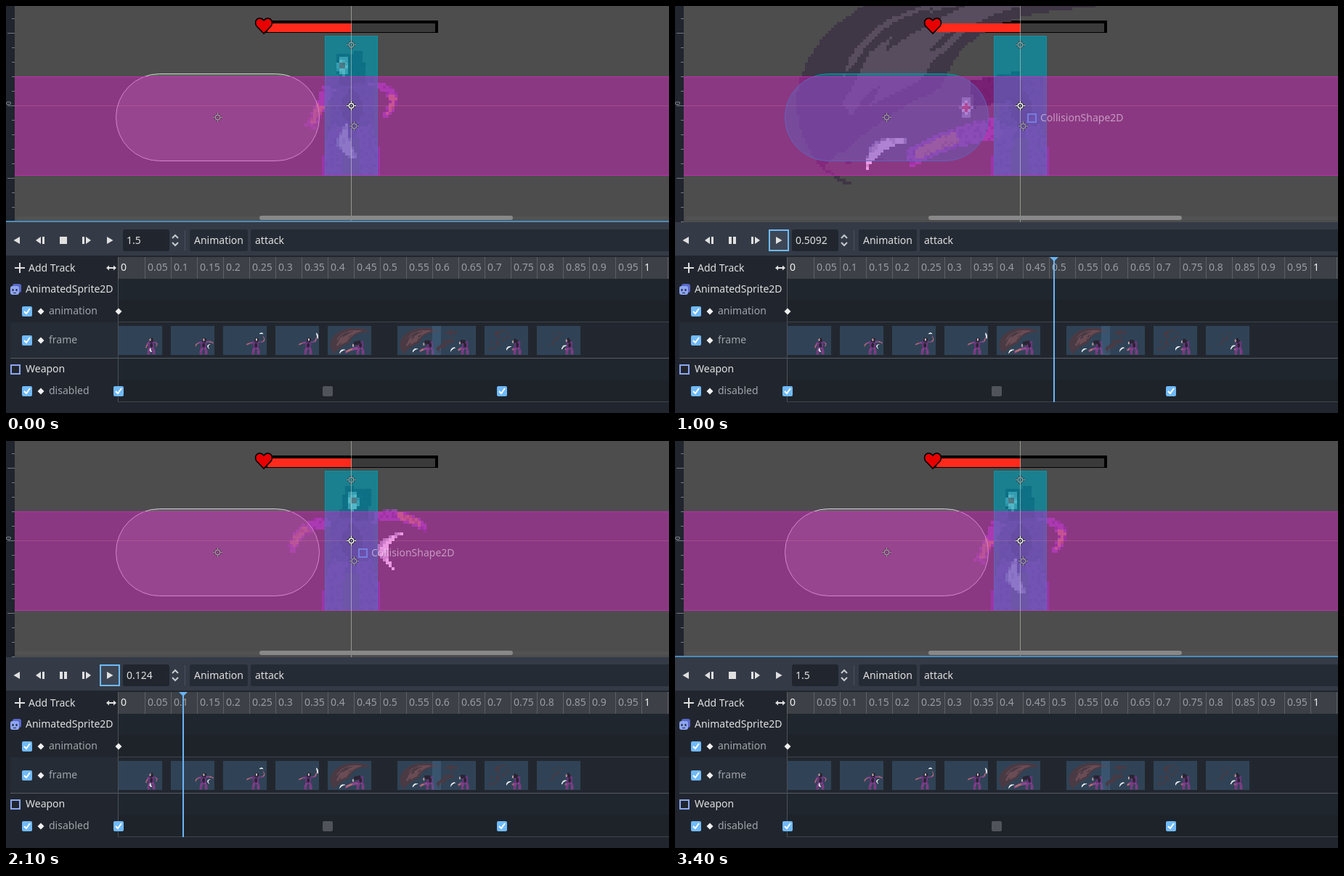
These frames come from a looping animation (913 px wide and 561 px high, 3700 ms). An HTML page with a canvas:

```html
<!DOCTYPE html>
<html lang="en">
<head>
<meta charset="utf-8">
<title>Attack animation</title>
<style>
html, body { margin: 0; width: 100%; height: 100%; overflow: hidden; background: #21262e; }
#stage { position: relative; width: 913px; height: 561px; overflow: hidden; font: 14px/20px "Noto Sans", "Open Sans", sans-serif; }
canvas, .t, #head { position: absolute; left: 0; top: 0; }
.t { white-space: pre; }
#head { top: 346px; width: 2px; height: 200px; background: #6ab5f5; }
#head::before { content: ""; position: absolute; left: -5px; border: 6px solid transparent; border-top: 6px solid #6ab5f5; border-bottom: 0; }
</style>
</head>
<body>
<div id="stage"><canvas id="view" width="913" height="561"></canvas></div>
<script>
const stage = document.getElementById('stage');
const g = document.getElementById('view').getContext('2d');
const BLUE = '#70bafa', LIGHT = '#e0e0e0', DIM = '#a0a4aa';

function rect(color, x, y, w, h) { g.fillStyle = color; g.fillRect(x, y, w, h); }
function round(color, x, y, w, h, r) {
  g.fillStyle = color; g.beginPath(); g.roundRect(x, y, w, h, r); g.fill();
}
function box(color, width, x, y, w, h) {
  g.strokeStyle = color; g.lineWidth = width; g.strokeRect(x, y, w, h);
}
function polygon(pts) {
  const p = new Path2D();
  for (const [x, y] of pts) p.lineTo(x, y);
  p.closePath();
  return p;
}
function stroke(color, width, ...pts) {
  g.strokeStyle = color; g.lineWidth = width; g.beginPath();
  for (let i = 0; i < pts.length; i += 2) g.lineTo(pts[i], pts[i + 1]);
  g.stroke();
}
// Triangle pointing along x (dir is 1 or -1), tip at x
function arrow(x, y, dir, len, half) {
  g.fillStyle = LIGHT;
  g.fill(polygon([[x, y], [x - dir * len, y - half], [x - dir * len, y + half]]));
}
function text(x, y, str, color = LIGHT) {
  const el = document.createElement('div');
  el.className = 't';
  el.style.cssText = `left:${x}px;top:${y - 10}px;color:${color}`;
  el.textContent = str;
  stage.append(el);
  return el;
}

// --- Sprite ---
const COLORS = { dark: '#2c2535', cloak: '#4a3c68', leg: '#6a4690', arm: '#8550a0', skin: '#b37a68', white: '#f2f2f4', pale: '#9fabb5', eye: '#e84238', smoke: '#3f3646', mist: '#584d5e' };
const THUMB = { ...COLORS, smoke: '#493a44', mist: '#6a4c54', cloak: '#6a3a80', leg: '#84408c', arm: '#904a90' };

const lerp = (a, b, t) => a + (b - a) * t;
const mix = (a, b, t) => a.map((v, i) => lerp(v, b[i], t));
const bulge = t => Math.sin(Math.PI * t);

function random(seed) {
  return () => (seed = (seed * 16807) % 2147483647) / 2147483647;
}

// Area between two edges that are sampled from from to to
function strip(key, edge, from = 0, to = 1) {
  const left = [], right = [];
  for (let i = 0; i <= 16; i++) {
    const [a, b] = edge(lerp(from, to, i / 16));
    left.push(a); right.unshift(b);
  }
  return { key, pts: [...left, ...right] };
}

// Bowed stroke from a to b; width is a function of the way along it
function limb(key, a, b, bend, width, from, to) {
  const [dx, dy] = [b[0] - a[0], b[1] - a[1]], len = Math.hypot(dx, dy);
  const mid = [(a[0] + b[0]) / 2 - dy * bend, (a[1] + b[1]) / 2 + dx * bend];
  return strip(key, t => {
    const p = mix(mix(a, mid, t), mix(mid, b, t), t), w = width(t) / 2 / len;
    return [[p[0] - dy * w, p[1] + dx * w], [p[0] + dy * w, p[1] - dx * w]];
  }, from, to);
}

// Point on the swing of the blade: u runs along it, depth from its outer to its inner edge
function swing(u, depth) {
  const angle = -(50 + 160 * u) * Math.PI / 180;
  const r = 1 - .75 * depth * Math.abs(bulge(u ** 1.4)) ** .6;
  return [420 + 253 * Math.cos(angle) * r, 135 + 175 * Math.sin(angle) * r];
}
function streak(key, depth, thick, from, to, power = 1) {
  return strip(key, u => {
    const half = thick / 2 * Math.max(0, bulge((u - from) / (to - from))) ** power;
    return [swing(u, depth - half), swing(u, depth + half)];
  }, from, to);
}
function streaks(seed, count, thick, long) {
  const rnd = random(seed);
  return Array.from({ length: count }, () => {
    const from = lerp(.27, .9, rnd());
    return streak('smoke', lerp(.1, .95, rnd()), thick * (.6 + rnd()), from, from + long * (.5 + rnd()));
  });
}
function smoke(stage) {
  if (stage > 1) return streaks(77 + stage, 46 - 7 * stage, .17 - .015 * stage, .2 - .035 * stage);
  return [
    strip('smoke', u => [swing(u, 0), swing(u, 1)]),
    streak('mist', .55, .62, .12, .86, .5),
    ...streaks(41, 14 + 8 * stage, .08, .22)];
}

function face([x, y]) {
  const oval = (key, w, h) => limb(key, [x, y - h], [x, y + h], 0, t => w * bulge(t) ** .4);
  return [oval('pale', 16, 14), oval('white', 11, 11), oval('eye', 8, 5)];
}
function arm(shoulder, hand, bend, thick) {
  const w = t => thick * (1 - .2 * t);
  return [limb('arm', shoulder, hand, bend, w), limb('skin', shoulder, hand, bend, t => w(t) * .6, .45, .9)];
}
function blade(a, b, bend, thick) {
  return [
    limb('pale', a, b, bend, t => thick * bulge(t) ** .6),
    limb('white', a, b, bend * .9, t => thick * .75 * bulge(t) ** .6)];
}
function body(head) {
  const wide = n => () => n;
  return [
    limb('cloak', [476, 98], [476, 180], 0, t => 66 - 8 * bulge(t)),
    limb('leg', [460, 165], [450, 234], .1, t => 22 + 8 * t),
    limb('leg', [492, 165], [502, 234], -.1, t => 22 + 8 * t),
    limb('dark', [476, 112], [476, 168], 0, t => 30 * bulge(t)),
    limb('dark', [head[0] + 8, head[1] - 18], [478, 108], 0, wide(38))];
}

// Wind-up: head x, then hand and bend of each arm, then blade ends, bend and width
const WIND_UP = [
  { head: 464, left: [418, 168], lb: 0, right: [520, 155], rb: -.8, from: [470, 162], to: [484, 212], bb: .45, bw: 18 },
  { head: 478, left: [392, 151], lb: .35, right: [578, 120], rb: -.25, from: [549, 125], to: [539, 181], bb: .9, bw: 15 },
  { head: 481, left: [378, 134], lb: .1, right: [550, 44], rb: .9, from: [510, 24], to: [553, 24], bb: -.35, bw: 15 },
  { head: 481, left: [378, 134], lb: .1, right: [558, 54], rb: .6, from: [556, 10], to: [572, 76], bb: -.2, bw: 18 }];

function windUp({ head, left, lb, right, rb, from, to, bb, bw }) {
  const top = [head, 83];
  return [...body(top), ...arm([446, 112], left, lb, 17), ...arm([506, 106], right, rb, 16), ...face(top), ...blade(from, to, bb, bw)];
}

// Strike: the figure rises from its low lunge while the smoke breaks up
function strike(n) {
  const t = n / 4, pull = 1 - (1 - t) ** 2;
  const head = mix([401, 140], [443, 92], t);
  return [...smoke(n), ...body(head),
    ...arm([448, 168], mix([320, 212], [432, 188], pull), .1, 30 - 10 * t),
    ...face(head), ...blade(mix([262, 228], [395, 186], t), mix([322, 186], [450, 142], t), -.45, 17)];
}
const poses = [...WIND_UP.map(windUp), ...[0, 1, 2, 3, 4].map(strike)];

// One canvas pixel per 4px cell; the grid starts at (-1, -58)
const CELL = 4, GRID_X = -1, GRID_Y = -58, COLS = 230, ROWS = 76;
function pixelate(pose, colors) {
  const canvas = document.createElement('canvas');
  canvas.width = COLS; canvas.height = ROWS;
  const c = canvas.getContext('2d');
  const rnd = random(9);
  for (const { key, pts } of pose) {
    const path = polygon(pts), xs = pts.map(p => p[0]), ys = pts.map(p => p[1]);
    const col = x => Math.floor((x - GRID_X) / CELL), row = y => Math.floor((y - GRID_Y) / CELL);
    const solid = key == 'smoke' || key == 'mist';
    for (let r = row(Math.min(...ys)); r <= row(Math.max(...ys)); r++) {
      for (let q = col(Math.min(...xs)); q <= col(Math.max(...xs)); q++) {
        if (!c.isPointInPath(path, GRID_X + (q + .5) * CELL, GRID_Y + (r + .5) * CELL)) continue;
        c.fillStyle = colors[key];
        c.fillRect(q, r, 1, 1);
        if (!solid && rnd() > .75) {
          c.fillStyle = 'rgba(20,10,30,.18)';
          c.fillRect(q, r, 1, 1);
        }
      }
    }
  }
  return canvas;
}
const sprites = poses.map(p => pixelate(p, COLORS));

function drawSprite(image, x, y, scale) {
  g.drawImage(image, x + GRID_X * scale, y + GRID_Y * scale, COLS * CELL * scale, ROWS * CELL * scale);
}

// --- Viewport ---
function gizmo(x, y, alpha) {
  g.save();
  g.translate(x, y);
  g.globalAlpha = alpha;
  for (const [color, w] of [['#222', 3.4], ['#fff', 1.4]]) {
    g.strokeStyle = color; g.lineWidth = w;
    g.beginPath(); g.arc(0, 0, 3.2, 0, 7); g.stroke();
    for (const [a, b] of [[1, 0], [-1, 0], [0, 1], [0, -1]]) stroke(color, w, a * 4, b * 4, a * 6.5, b * 6.5);
  }
  g.restore();
}

function viewport(pose, armed, hover, focus) {
  g.save();
  g.beginPath(); g.rect(0, 0, 913, 298); g.clip();
  rect('#4d4d4d', 0, 0, 913, 298);
  rect('#000', 357, 20, 238, 17);
  g.imageSmoothingEnabled = false;
  drawSprite(sprites[pose], 0, 0, 1);
  rect('#ff2a1c', 360, 24, 116, 12);
  rect('#3a3a3a', 476, 24, 115, 12);

  const heart = new Path2D('M355 38 L344.5 27 Q342 21 346 18 Q351 15 355 20 Q359 15 364 18 Q368 21 365.5 27 Z');
  g.fillStyle = '#e80000'; g.fill(heart);
  g.strokeStyle = '#000'; g.lineWidth = 1.6; g.stroke(heart);

  rect('rgba(0,153,176,.664)', 439, 41, 73, 193);
  box('rgba(0,160,180,.6)', 1, 439.5, 41.5, 72, 192);
  g.beginPath(); g.roundRect(151.5, 93.5, 280, 120, 60);
  g.fillStyle = armed ? 'rgba(0,153,179,.42)' : 'rgba(129,129,129,.42)'; g.fill();
  g.strokeStyle = armed ? '#0796ac' : '#cfcfcf'; g.stroke();
  rect('rgba(225,27,203,.42)', 12, 97, 901, 137);
  for (const y of [97, 233]) rect('rgba(225,40,203,.6)', 12, y, 901, 1);

  rect('rgba(240,150,170,.2)', 12, 137, 901, 1);
  rect('rgba(215,225,210,.5)', 475, 0, 1, 298);
  gizmo(475.5, 53.5, .45); gizmo(291.5, 153.5, .45); gizmo(479.5, 165.5, .45); gizmo(475.5, 137.5, 1);
  if (hover) box('rgba(125,145,245,.7)', 2, 486, 149, 11, 11);

  round('#525252', 14, 290, 905, 5, 2);
  round('#888', 349, 289, 349, 6, 3);
  rect('#20252e', 0, 0, 12, 298);
  for (let y = 17; y < 298; y += 20) {
    const major = (y - 37) % 100 == 0;
    rect('#747981', major ? 2 : 8, y, major ? 10 : 4, 1);
  }
  if (focus) rect('#4d8db9', 0, 296, 913, 2);
  g.restore();
}

function toolbar(playing, focus) {
  rect('#343b47', 0, 298, 913, 46);
  round('#21262e', 161, 308, 64, 30, 3);
  round('#252b34', 253, 308, 80, 30, 3);
  round('#252b34', 337, 308, 590, 30, 3);
  rect('#4b525d', 246, 309, 1, 28);
  for (const dir of [-1, 1]) stroke('#c8cacd', 2, 229, 323 + dir * 3, 233, 323 + dir * 7, 237, 323 + dir * 3);
  if (focus) {
    round('#3d4655', 129, 308, 28, 30, 3);
    box(BLUE, 2, 130, 309, 26, 28);
  }
  const bar = (x, w) => rect(LIGHT, x, 318, w, 10);
  arrow(10.5, 323, -1, 8.5, 5);
  arrow(41, 323, -1, 7, 5); bar(50, 3);
  if (playing) { bar(74, 4); bar(80, 4); } else bar(74, 10);
  bar(105, 3); arrow(117, 323, 1, 7, 5);
  arrow(147.5, 323, 1, 8.5, 5);
}

// --- Track list ---
const KEYS = [0, .1, .2, .3, .4, .5333, .6, .7, .8];
const timeX = t => 155 + 720 * t;

function check(x, y) {
  round(BLUE, x - 7, y - 7, 14, 14, 2);
  stroke('#fff', 2, x - 4, y, x - 1, y + 3, x + 4, y - 4);
}
function diamond(x, y) {
  g.fillStyle = '#f0f0f0';
  g.fill(polygon([[x - 4.5, y], [x, y - 4.5], [x + 4.5, y], [x, y + 4.5]]));
}

function tracks() {
  rect('#21262e', 0, 344, 913, 217);
  rect('#1e232a', 155, 376, 758, 170);
  for (const y of [376, 486]) rect('#20262e', 155, y, 758, 29);
  rect('#262c35', 6, 436, 149, 49);
  rect('#22272f', 155, 436, 758, 49);
  rect('#3d4046', 155, 346, 758, 30);
  for (let i = 0; i < 22; i++) rect('#5c5f64', 154 + 36 * i + (i > 0), 346, 1, 30);
  for (const y of [435, 545]) rect('#40454c', 155, y, 758, 1);
  rect('#565b62', 6, 485, 907, 1);
  rect('#4b5057', 154, 376, 1, 170);

  stroke(LIGHT, 2, 12, 361, 26, 361); stroke(LIGHT, 2, 19, 354, 19, 368);
  stroke(LIGHT, 2, 140, 361, 150, 361);
  arrow(138, 361, -1, 4, 3.5); arrow(152, 361, 1, 4, 3.5);

  round('#5a68c8', 9, 383, 12, 12, 3);
  round('#8da5f3', 6, 386, 12, 12, 3);
  rect('#252b40', 8.5, 390, 2, 3); rect('#252b40', 13.5, 390, 2, 3); rect('#252b40', 10, 395, 4, 1);
  box('#8da5f3', 2, 7, 495, 12, 12);

  for (const y of [421, 461, 531]) { check(29, y); diamond(48, y); }
  diamond(155, 421);
  g.imageSmoothingEnabled = true;
  KEYS.forEach((key, i) => {
    const x = Math.round(timeX(key));
    rect('rgba(70,110,145,.4)', x, 441, 60, 40);
    g.save();
    g.beginPath(); g.rect(x, 441, 60, 40); g.clip();
    drawSprite(pixelate(poses[i], THUMB), x + 45 - 475 * .135, 448.8, .135);
    g.restore();
  });
  check(155, 531); check(683, 531);
  round('#50545a', 436, 524, 14, 14, 2);
}

const hoverText = text(503, 154, 'CollisionShape2D', 'rgba(240,225,240,.58)');
const zero = text(1, 134, '0', DIM);
zero.style.cssText += 'font-size:9px;transform:rotate(-90deg)';
const clock = text(166, 322.5, '1.5');
text(259, 322.5, 'Animation');
text(343, 322.5, 'attack');
text(31, 361, 'Add Track');
for (let i = 0; i <= 20; i++) text(159 + 36 * i - (i == 0), 360, String(i / 20), i % 20 ? '#999ca1' : '#f0f0f0');
text(27, 390, 'AnimatedSprite2D');
text(59, 420, 'animation', DIM);
text(59, 460, 'frame', DIM);
text(27, 500, 'Weapon');
text(59, 530, 'disabled', DIM);
const head = document.createElement('div');
head.id = 'head';
stage.append(head);

// --- Timeline, in steps of 100 ms ---
const STEP = 100, HOVER = 3, PLAY = 6, REPEAT = 20, CLICK = 27, STOP = 34, LOOP = 3700;

function position(step) {
  if (step == PLAY) return 0;
  return step < REPEAT ? .2922 + .1085 * (step - 8) : .4486 + .108675 * (step - 24) + (step < 24 ? .0014 : 0) * (24 - step) / 3;
}

function draw(step) {
  const playing = step >= PLAY && step < STOP;
  const pos = playing ? position(step) : 1.5;
  const pose = playing ? KEYS.filter(k => k <= pos).length - 1 : 0;
  const clicked = step >= CLICK;
  const hover = step >= HOVER && !clicked;
  viewport(pose, playing && pos >= .4 && pos < .7333, hover, step < PLAY || clicked);
  toolbar(playing, playing && !clicked);
  clock.textContent = String(+pos.toFixed(4));
  hoverText.style.display = hover ? '' : 'none';
  head.style.display = playing ? '' : 'none';
  head.style.left = Math.round(timeX(pos) - 1) + 'px';
}

tracks();
let last = -1;
const start = performance.now();
function tick() {
  const step = Math.min(STOP, Math.floor((performance.now() - start) % LOOP / STEP));
  if (step != last) draw(last = step);
  requestAnimationFrame(tick);
}
tick();
</script>
</body>
</html>
```
